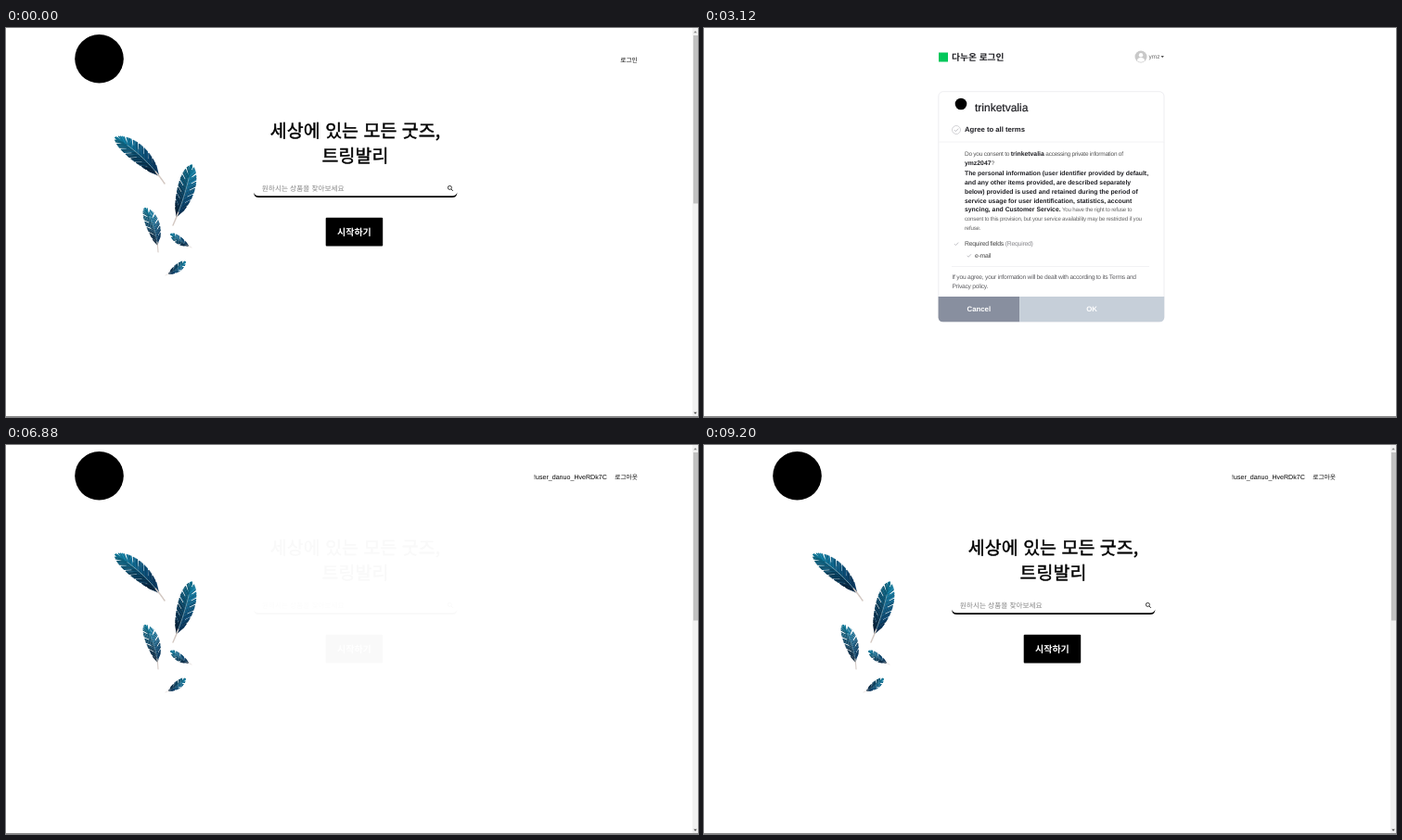
These frames come from a looping animation (746x420 px, 9.28 s). An HTML page:

```html
<!DOCTYPE html>
<html lang="ko">
<head>
<meta charset="utf-8">
<title>Login flow</title>
<style>
html, body { margin: 0; width: 100%; height: 100%; overflow: hidden; background: #fff; }
svg { display: block; width: 746px; height: 420px; text-rendering: geometricPrecision; }
text { font-family: "Liberation Sans", Arial, sans-serif; white-space: pre; }
.ko { font-family: "Noto Sans CJK KR", "Noto Sans CJK JP", sans-serif; }
.mid { text-anchor: middle; }
.title { font-size: 19.5px; stroke: #000; stroke-width: .45px; }
.bold { font-weight: 700; font-size: 6.83px; letter-spacing: 0; fill: #1e1e23; }
.ask { font-size: 6.5px; letter-spacing: -.25px; fill: #555; }
.small { font-size: 6.2px; letter-spacing: -.23px; fill: #666; }
.field { font-size: 6.8px; letter-spacing: -.22px; fill: #444; }
.note { font-size: 6.7px; letter-spacing: -.25px; fill: #5c5c60; }
.btn { font-weight: 700; font-size: 7.8px; fill: #fff; }

.scene, .guest, .member, .on, .off { animation: 9280ms step-end infinite; }
#home { animation-name: home; }
#login { animation-name: login; }
#consent { animation-name: consent; }
.guest, .off { animation-name: early; }
.member, .on { animation-name: late; }
#hero { animation: hero 9280ms linear infinite; }
@keyframes home { 0% { opacity: 1 } 19.8276% { opacity: 0 } 69.8276%, 100% { opacity: 1 } }
@keyframes login { 0% { opacity: 0 } 19.8276% { opacity: 1 } 33.6207%, 100% { opacity: 0 } }
@keyframes consent { 0% { opacity: 0 } 33.6207% { opacity: 1 } 69.8276%, 100% { opacity: 0 } }
@keyframes early { 0% { opacity: 1 } 46.5517%, 100% { opacity: 0 } }
@keyframes late { 0% { opacity: 0 } 46.5517%, 100% { opacity: 1 } }
@keyframes hero { 0%, 19.82% { opacity: 1 } 19.83%, 73.7% { opacity: 0 } 92.5%, 100% { opacity: 1 } }
</style>
</head>
<body>
<svg viewBox="0 0 746 420">
  <defs>
    <path id="tick" d="M-2.1 .1L-.6 1.6L2.2 -1.4" fill="none" stroke-width="1"/>
    <g id="bar">
      <rect x="740" width="6" height="420" fill="#f1f1f1"/>
      <path d="M741.3 5.2h3.6l-1.8-2.2z" fill="#8a8a8a"/>
      <path d="M741.3 414.8h3.6l-1.8 2.2z" fill="#505050"/>
    </g>
    <filter id="shadow" x="-10%" y="-10%" width="120%" height="120%">
      <feDropShadow dx="0" dy="1" stdDeviation="1.6" flood-opacity=".16"/>
    </filter>
  </defs>

  <g id="home" class="scene">
    <circle cx="100.5" cy="33.3" r="26.3"/>
    <g id="feathers" fill="none" stroke-linecap="round"></g>
    <text class="ko guest" x="662.3" y="37" font-size="6.7">로그인</text>
    <g class="member">
      <text x="569" y="37" font-size="7.1">!user_danuo_HveRDk7C</text>
      <text class="ko" x="656.3" y="37" font-size="6.7">로그아웃</text>
    </g>
    <g id="hero">
      <text class="ko mid title" x="376.5" y="118">세상에 있는 모든 굿즈,</text>
      <text class="ko mid title" x="376.5" y="144.7">트링발리</text>
      <text class="ko" x="275.8" y="175.7" font-size="7.66" fill="#858585">원하시는 상품을 찾아보세요</text>
      <path d="M267 177.5q.4 5.5 5.5 5.5h208.500q5.100 0 5.500 -5.500q-1 3.700 -5.500 3.700h-208.500q-4.500 0 -5.500 -3.700z"/>
      <g fill="none" stroke="#222" stroke-width=".9">
        <circle cx="478.4" cy="172.4" r="2"/>
        <path d="M479.9 173.9l2 2"/>
      </g>
      <rect x="344.7" y="204.7" width="61.5" height="30.8" rx="1"/>
      <text class="ko mid" x="375.4" y="223.7" font-size="10" font-weight="700" fill="#fff">시작하기</text>
    </g>
    <use href="#bar"/>
    <rect x="741" y="8" width="5" height="181.5" fill="#c1c1c1"/>
  </g>

  <g id="login" class="scene">
    <rect x="230" y="22" width="281" height="253" rx="3" fill="#fff" filter="url(#shadow)"/>
    <circle cx="370.2" cy="103" r="41.3"/>
    <rect x="316" y="182" width="109" height="28" rx="2" fill="#03c75a"/>
    <rect x="334" y="192" width="9" height="9" fill="#fff"/>
    <text class="ko" x="350" y="199.7" font-size="9.5" font-weight="500" fill="#fff">다누온 로그인</text>
    <rect x="316" y="213" width="109" height="29" rx="3" fill="#fee500"/>
    <circle cx="340.7" cy="227.5" r="5.4" fill="#1e1b00"/>
    <text class="ko" x="353" y="230.7" font-size="8.5" fill="#2a2600">모리두 로그인</text>
    <use href="#bar"/>
    <rect x="741" y="8" width="5" height="353" fill="#c1c1c1"/>
  </g>

  <g id="consent" class="scene">
    <rect x="253" y="26.5" width="10" height="10" fill="#03c75a"/>
    <text class="ko" x="267" y="34.7" font-size="9.75" font-weight="700" fill="#1e1e23">다누온 로그인</text>
    <circle cx="471" cy="31" r="6.5" fill="#c9c9c9"/>
    <g fill="#fff">
      <circle cx="471" cy="29.2" r="2.2"/>
      <path d="M466.8 35.3q.7 -3.3 4.2 -3.3t4.2 3.3q-4.2 3 -8.4 0z"/>
    </g>
    <text x="479.5" y="33.3" font-size="6.5" fill="#666">ymz</text>
    <path d="M492.5 30h3.4l-1.7 2.2z" fill="#555"/>

    <rect x="252.8" y="68.7" width="243.2" height="248.3" rx="5" fill="#fff" stroke="#e9e9ec" stroke-width=".8"/>
    <circle cx="277" cy="82" r="6.3"/>
    <text x="292" y="89.8" font-size="12" fill="#1e1e23" stroke="#1e1e23" stroke-width=".2">trinketvalia</text>
    <text class="bold" x="281" y="112.2" style="font-size:7.7px">Agree to all terms</text>
    <path d="M253 123h243M267 257.5h213" stroke="#efeff1" stroke-width=".8"/>

    <text class="ask" x="281" y="138">Do you consent to <tspan class="bold">trinketvalia</tspan> accessing private information of</text>
    <text class="ask" x="281" y="148.3"><tspan class="bold">ymz2047</tspan>?</text>
    <text class="bold" x="281" y="159">The personal information (user identifier provided by default,</text>
    <text class="bold" x="281" y="169">and any other items provided, are described separately</text>
    <text class="bold" x="281" y="178.8">below) provided is used and retained during the period of</text>
    <text class="bold" x="281" y="188.6">service usage for user identification, statistics, account</text>
    <text class="small" x="281" y="198.3"><tspan class="bold">syncing, and Customer Service.</tspan> You have the right to refuse to</text>
    <text class="small" x="281" y="208">consent to this provision, but your service availability may be restricted if you</text>
    <text class="small" x="281" y="217.7">refuse.</text>
    <text class="field" x="281" y="234.5">Required fields <tspan fill="#85858a">(Required)</tspan></text>
    <text class="field" x="292" y="248">e-mail</text>
    <text class="note" x="267.5" y="271.2">If you agree, your information will be dealt with according to its Terms and</text>
    <text class="note" x="267.5" y="280.8">Privacy policy.</text>

    <path d="M252.6 290h87.6v27.3h-82.6q-5 0 -5 -5z" fill="#888f9f"/>
    <g class="off">
      <circle cx="272" cy="110" r="4.5" fill="#fff" stroke="#c8c8cc" stroke-width=".8"/>
      <g stroke="#bfbfc4">
        <use href="#tick" x="272" y="110"/>
        <use href="#tick" x="272" y="233"/>
        <use href="#tick" x="285.7" y="245.7"/>
      </g>
      <path d="M340.2 290h156v22.3q0 5 -5 5h-151z" fill="#c6cfd9"/>
    </g>
    <g class="on">
      <circle cx="272" cy="110" r="5" fill="#09aa5c"/>
      <use href="#tick" x="272" y="110" stroke="#fff"/>
      <g stroke="#09aa5c">
        <use href="#tick" x="272" y="233"/>
        <use href="#tick" x="285.7" y="245.7"/>
      </g>
      <path d="M340.2 290h156v22.3q0 5 -5 5h-151z" fill="#09aa5c"/>
    </g>
    <text class="btn mid" x="296.3" y="306.2">Cancel</text>
    <text class="btn mid" x="418" y="306.2">OK</text>
  </g>

  <rect y="419" width="746" height="1" fill="#8a8a8a"/>
</svg>
<script>
const VANE = 0.84;   // share of the length that carries barbs
const LEAN = 0.12;   // how far barbs lean towards the tip

// Tip, quill end, half width and bend of the spine.
function feather(x0, y0, x1, y1, half, bend) {
  const dx = x1 - x0, dy = y1 - y0, len = Math.hypot(dx, dy);
  const at = (u, side) => {
    const off = side + bend * 4 * u * (1 - u);
    return `${(x0 + dx * u - dy / len * off).toFixed(2)} ${(y0 + dy * u + dx / len * off).toFixed(2)}`;
  };
  const line = (d, stroke, width) => `<path d="${d}" stroke="${stroke}" stroke-width="${width.toFixed(2)}"/>`;
  const spine = (a, b) => 'M' + Array.from({ length: 9 }, (_, i) => at(a + (b - a) * i / 8, 0)).join('L');
  const count = Math.round(len / 2) + 6;
  let out = '';
  for (let i = 1; i <= count; i++) {
    const v = i / count, u = v * VANE;
    for (const side of [-1, 1]) {
      const notch = (i + side) % 5 === 0 ? 0.4 : 1;
      const end = Math.max(0, u - LEAN * notch);
      const w = half * notch * Math.sin(Math.PI * (end / VANE) ** 0.8) ** 0.65;
      const light = (side < 0 ? 36 : 30) - 19 * v + (i % 3 ? 0 : 5);
      out += line(`M${at(u, 0)}L${at(end, side * w)}`,
        `hsl(${192 + 16 * v} 80% ${light}%)`, Math.max(1.1, len / 45));
    }
  }
  return out + line(spine(0.2, VANE), '#a9cbd8', len / 110) + line(spine(VANE - 0.06, 1), '#d3c8c2', len / 48);
}

document.getElementById('feathers').innerHTML = [
  [118.5, 118.5, 171, 168, 8.8, -4],
  [200, 148.5, 180, 213, 8.8, -2],
  [150, 194.5, 164, 242, 7, -3],
  [178, 222.5, 200, 237, 3.8, 1],
  [193, 252.5, 172, 267, 3.8, -1]
].map(f => feather(...f)).join('');
</script>
</body>
</html>
```
